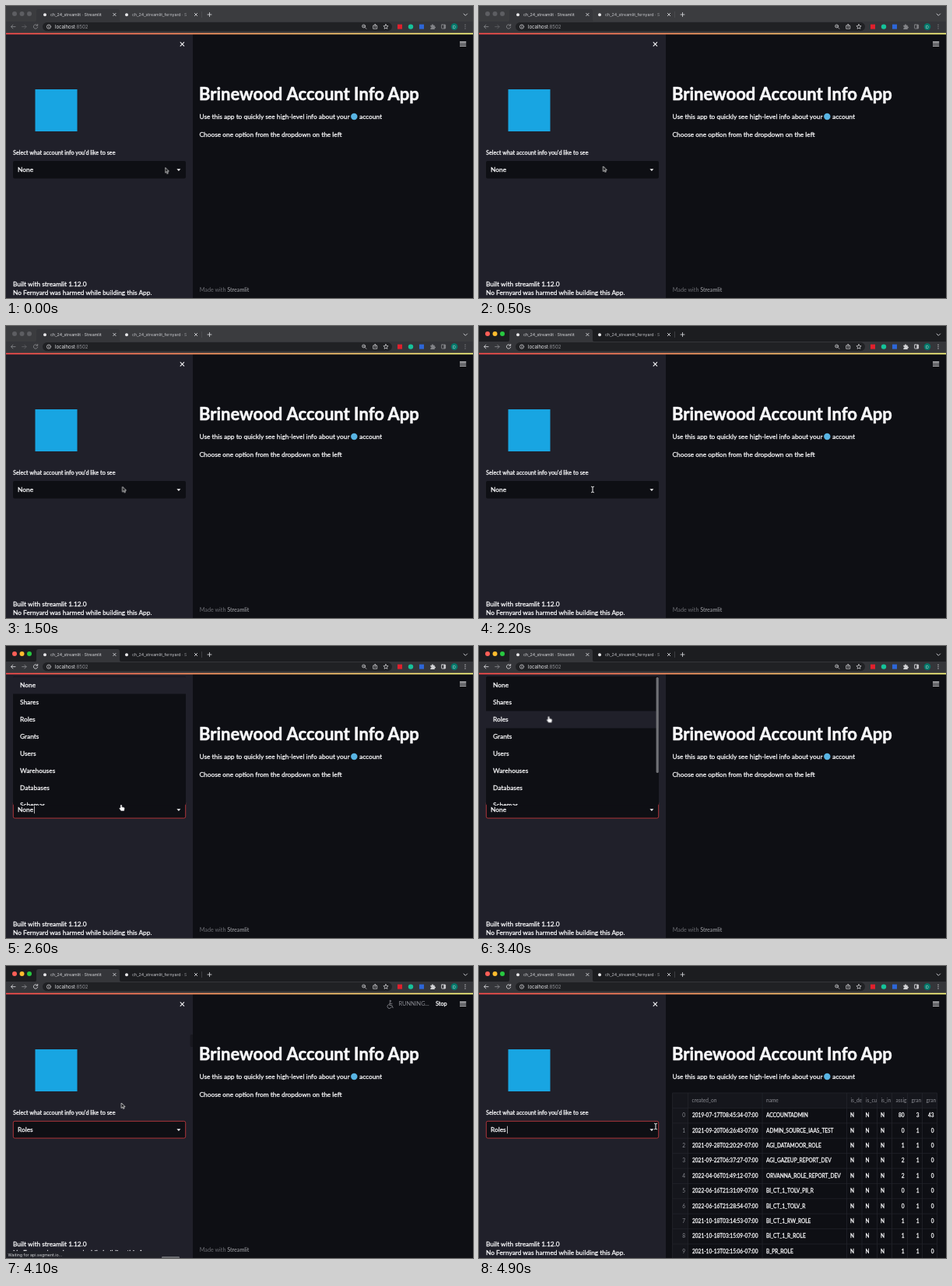
Write an HTML page that moves like this. It is 600 by 375 pixels and loops after 5 s.

```html
<!DOCTYPE html>
<html lang="en">
<head>
<meta charset="utf-8">
<title>Account Info App</title>
<style>
html, body { margin: 0; width: 100%; height: 100%; overflow: hidden; background: #0e0f14; }
svg { display: block; width: 100vw; height: 100vh; }
text { font: 8.36px Lato, sans-serif; fill: #fafafc; stroke: #fafafc; stroke-width: .26px; white-space: pre; }
text.ui { font: 5.3px Inter, sans-serif; fill: #d6d7da; stroke: none; }
text.url { font-size: 6.05px; fill: #e6e7ea; }
text.h1 { font-size: 22px; font-weight: 700; stroke-width: .5px; }
text.label { font-size: 7.3px; }
text.foot { font-size: 7.2px; fill: #6b6c72; stroke: none; }
text.cell { font-size: 6.55px; }
text.dim { fill: #8b8c93; stroke: none; }
.end { text-anchor: end; }
.mid { text-anchor: middle; }
.line { fill: none; stroke: #d0d1d4; stroke-width: .9; stroke-linecap: round; stroke-linejoin: round; }
.grid { fill: none; stroke: #25262d; stroke-width: .7; }

/* 2% of the loop is one 100 ms tick */
.anim { animation: 5s step-end infinite; }
.focus { animation-name: focus; }
.blur { animation-name: blur; }
.wake { animation-name: wake; }
.open { animation-name: open; }
.closed { animation-name: closed; }
.before { animation-name: before; }
.after { animation-name: after; }
.active { animation-name: active; }
.caret { animation-name: caret; }
.thumb { animation-name: thumb; }
.hover { animation-name: hover; }
.running { animation-name: running; }
.status { animation-name: status; }
.intro { animation-name: intro; }
.result { animation-name: result; }
.arrow { animation-name: arrow; }
.ibeam { animation-name: ibeam; }
.hand { animation-name: hand; }
.pointer { animation: move 5s infinite; }

@keyframes focus { 0% { opacity: 0 } 36%, 100% { opacity: 1 } }
@keyframes blur { 0% { opacity: 1 } 36%, 100% { opacity: 0 } }
@keyframes wake { 0% { opacity: .5 } 36%, 100% { opacity: 1 } }
@keyframes open { 0% { opacity: 0 } 48% { opacity: 1 } 70%, 100% { opacity: 0 } }
@keyframes closed { 0% { opacity: 1 } 48% { opacity: 0 } 70%, 100% { opacity: 1 } }
@keyframes before { 0% { opacity: 1 } 70%, 100% { opacity: 0 } }
@keyframes after { 0% { opacity: 0 } 70%, 100% { opacity: 1 } }
@keyframes active { 0% { opacity: 0 } 48%, 100% { opacity: 1 } }
@keyframes caret { 0%, 58%, 80% { opacity: 0 } 48%, 70%, 90%, 100% { opacity: 1 } }
@keyframes thumb { 0% { opacity: 0 } 54%, 100% { opacity: 1 } }
@keyframes hover {
  0% { transform: none }
  54% { transform: translateY(110px) }
  56% { transform: translateY(88px) }
  58%, 100% { transform: translateY(44px) }
}
@keyframes running { 0% { opacity: 0 } 72% { opacity: 1 } 84%, 100% { opacity: 0 } }
@keyframes status { 0% { opacity: 0 } 74% { opacity: 1 } 84%, 100% { opacity: 0 } }
@keyframes intro { 0% { opacity: 1 } 84%, 100% { opacity: 0 } }
@keyframes result { 0% { opacity: 0 } 84%, 100% { opacity: 1 } }
@keyframes arrow { 0%, 70% { opacity: 1 } 36%, 94%, 100% { opacity: 0 } }
@keyframes ibeam { 0%, 48% { opacity: 0 } 36%, 94%, 100% { opacity: 1 } }
@keyframes hand { 0%, 70%, 100% { opacity: 0 } 48% { opacity: 1 } }
@keyframes move {
  0% { transform: translate(204.5px, 207.5px); animation-timing-function: steps(6) }
  12% { transform: translate(150.5px, 205.5px); animation-timing-function: step-end }
  28% { transform: translate(150.5px, 205.5px); animation-timing-function: steps(5) }
  38%, 44% { transform: translate(146px, 210px); animation-timing-function: steps(2) }
  48%, 52% { transform: translate(148px, 204px); animation-timing-function: steps(3) }
  58%, 70% { transform: translate(89.5px, 90.5px); animation-timing-function: steps(3) }
  76% { transform: translate(114.5px, 163px); animation-timing-function: steps(10) }
  96%, 100% { transform: translate(227px, 206px) }
}
</style>
</head>
<body>
<svg viewBox="0 0 600 375" preserveAspectRatio="none">
  <defs>
    <linearGradient id="deco"><stop stop-color="#ff4b4b"/><stop offset="1" stop-color="#fffd80"/></linearGradient>
    <linearGradient id="fade" gradientUnits="userSpaceOnUse" x1="162" x2="240" y1="0" y2="0">
      <stop offset=".82" stop-color="#c4c5c9"/><stop offset="1" stop-color="#c4c5c9" stop-opacity="0"/>
    </linearGradient>
    <clipPath id="list"><rect x="9" y="39" width="222" height="165.5" rx="2"/></clipPath>
  </defs>

  <!-- browser window -->
  <rect width="600" height="21" fill="#1c1d20"/>
  <rect class="anim blur" width="600" height="21" fill="#3b3c3f"/>
  <path d="M36 20.5q3 0 3-3V7q0-3 3-3H143q3 0 3 3V17.5q0 3 3 3z" fill="#35363a"/>
  <rect y="20" width="600" height="16" fill="#35363a"/>
  <g class="anim blur" fill="#5d5e62"><circle cx="11" cy="10" r="3"/><circle cx="20.5" cy="10" r="3"/><circle cx="30" cy="10" r="3"/></g>
  <g class="anim focus"><circle cx="11" cy="10" r="3" fill="#ff5f57"/><circle cx="20.5" cy="10" r="3" fill="#febc2e"/><circle cx="30" cy="10" r="3" fill="#28c840"/></g>
  <circle cx="50" cy="11.2" r="2" fill="#e8e8ea"/>
  <circle cx="155" cy="11.2" r="2" fill="#e8e8ea"/>
  <text class="ui" x="57" y="13.3">ch_24_streamlit · Streamlit</text>
  <text class="ui" x="162" y="13.3" style="fill:url(#fade)">ch_24_streamlit_fernyard · S</text>
  <g class="line">
    <path d="M137.7 9.3l3.4 3.4m0-3.4l-3.4 3.4M242.3 9.3l3.4 3.4m0-3.4l-3.4 3.4M259 11h5m-2.5-2.5v5M588 10l2.3 2.3L592.6 10"/>
    <path d="M251.5 7.5v7" stroke="#55565a" stroke-width=".6"/>
  </g>
  <g class="line anim wake">
    <path d="M12 26.6H6.6m2.3-2.4l-2.4 2.4 2.4 2.4"/>
    <path d="M20.6 26.6H26m-2.3-2.4l2.4 2.4-2.4 2.4" stroke="#85868a"/>
    <path d="M40.3 24.9A2.7 2.7 0 1 0 40.7 27.2M40.7 23.4v1.9h-1.9"/>
  </g>
  <rect x="47" y="21" width="449" height="11.2" rx="5.6" fill="#202124"/>
  <g class="line" style="stroke-width:.75">
    <circle cx="55" cy="26.6" r="2.6"/><path d="M55 26.4v1.3M55 25.1v.1"/>
    <circle cx="459.6" cy="25.9" r="2"/><path d="M461.2 27.5l1.7 1.8M458.8 25.9h1.6"/>
    <path d="M473 25.2h-1.3v4h5v-4h-1.3M474.2 27.6v-4.2m-1.3 1.2l1.3-1.3 1.3 1.3"/>
    <path d="M488 23.5l.9 2 2.2.2-1.7 1.5.5 2.1-1.9-1.1-1.9 1.1.5-2.1-1.7-1.5 2.2-.2z"/>
  </g>
  <text class="ui url" x="63" y="28.7">localhost<tspan fill="#94959a">:8502</tspan></text>
  <rect x="503" y="23.6" width="6" height="6" fill="#e0202d"/>
  <circle cx="520" cy="26.6" r="3.2" fill="#15c39a"/>
  <rect x="531" y="23.6" width="6" height="6" fill="#2d66d8"/>
  <g class="anim wake" fill="#d0d1d4">
    <path d="M545.3 24.8h1.7q0-1.5 1-1.5t1 1.5h1.7v1.7q1.4 0 1.4 1t-1.4 1v1.6h-5.4v-1.7q1.2 0 1.2-.9t-1.2-.9z"/>
    <rect class="line" x="559.6" y="24" width="5" height="5" rx=".5"/>
    <path d="M562.4 24h2.2v5h-2.2z"/>
    <circle cx="590" cy="24.3" r=".7"/><circle cx="590" cy="26.6" r=".7"/><circle cx="590" cy="28.9" r=".7"/>
  </g>
  <circle cx="576" cy="26.6" r="4.3" fill="#00796b"/>
  <text class="ui mid" x="576" y="28.5">D</text>

  <!-- page -->
  <rect y="35.5" width="600" height="339.5" fill="#0e0f14"/>
  <rect y="35.5" width="240" height="339.5" fill="#20202a"/>
  <rect y="34.7" width="600" height="1.7" fill="url(#deco)"/>
  <path d="M583 46.4h8.2M583 48.8h8.2M583 51.2h8.2" stroke="#f6f6f8" stroke-width="1.1"/>
  <text class="h1" x="248" y="120.7">Brinewood</text>
  <text class="h1" x="360.5" y="120.7">Account Info App</text>
  <text x="248.5" y="145">Use this app to quickly see high-level info about your</text>
  <circle cx="447.3" cy="142" r="4.2" fill="#58b4e4"/>
  <text x="454" y="145">account</text>
  <g class="anim intro">
    <text x="248.5" y="168">Choose one option from the dropdown on the left</text>
    <text class="foot" x="248.8" y="367.3">Made with <tspan fill="#a6a7ac">Streamlit</tspan></text>
  </g>
  <g class="anim running">
    <g class="line" style="stroke:#85868c">
      <circle cx="493.6" cy="45" r=".8"/>
      <path d="M493.3 46.8l-.6 3.6h3l1.4 3.3M493.2 48.2h2.8M491.4 49.4a2.7 2.7 0 1 0 3.8 3.2"/>
    </g>
    <text class="label dim" x="504.5" y="51.4">RUNNING...</text>
    <text class="label" x="552" y="51.4">Stop</text>
  </g>
  <g id="table" class="anim result"></g>

  <!-- sidebar -->
  <g class="anim closed">
    <path d="M223.8 46.4l5.2 5.2m0-5.2l-5.2 5.2" stroke="#f4f4f6" stroke-width="1.1"/>
    <rect x="37.5" y="107" width="54" height="54" fill="#18a5e2"/>
    <text class="label" x="9" y="190.6">Select what account info you'd like to see</text>
  </g>
  <rect x="9" y="199" width="222" height="22.4" rx="2" fill="#0e0f14"/>
  <rect class="anim active" x="9.3" y="199.3" width="221.4" height="21.8" rx="2" fill="none" stroke="#d64046" stroke-width=".8"/>
  <text class="anim before" x="15" y="213.4">None</text>
  <text class="anim after" x="15" y="213.4">Roles</text>
  <path class="anim caret" d="M36.4 205.6v9.6" stroke="#fff" stroke-width=".8"/>
  <path d="M219.4 209.2h5l-2.5 2.7z" fill="#f4f4f6"/>
  <text x="9" y="359.8">Built with streamlit 1.12.0</text>
  <text x="9" y="370.6">No Fernyard was harmed while building this App.</text>
  <g class="anim status">
    <rect y="366" width="198" height="9" fill="#202128"/>
    <text class="ui" x="2.5" y="372.6">Waiting for api.segment.io...</text>
    <rect x="200" y="373" width="23" height="3" rx="1.2" fill="#68696e"/>
    <path d="M240 88h-1.5q-2 0-2 2v12q0 2 2 2h1.5z" fill="#18181f"/>
  </g>

  <g class="anim open">
    <g id="menu" clip-path="url(#list)">
      <rect x="9" y="39" width="222" height="166" fill="#0e0f14"/>
      <rect class="anim hover" x="9" y="39.5" width="222" height="22" fill="#20202a"/>
    </g>
    <rect class="anim thumb" x="227.6" y="40" width="3.2" height="123" rx="1.6" fill="#707176"/>
  </g>

  <!-- mouse pointer, hotspot at 0,0 -->
  <g class="pointer" stroke-linejoin="round">
    <path class="anim arrow" d="M0 0v6.6l1.6-1.4 1 2.3 1.1-.5-1-2.3h2.1z" fill="#08080a" stroke="#fff" stroke-width=".75"/>
    <path class="anim ibeam" d="M-1.9-3.8q1.9 0 1.9 1.2 0-1.2 1.9-1.2M0-2.6v5.2M-1.9 3.8q1.9 0 1.9-1.2 0 1.2 1.9 1.2" fill="none" stroke="#f4f4f4" stroke-width="1"/>
    <path class="anim hand" d="M-.7.6q.7-1 1.4 0v2.3l2.6.5q.9.2.8 1.2l-.5 2.8H-.2L-2.3 4.6q.3-1 1.6-.1z" fill="#fff" stroke="#e8e8ea" stroke-width=".5"/>
  </g>
</svg>
<script>
const NS = 'http://www.w3.org/2000/svg';

function add(parent, tag, attrs, text = '') {
  const el = document.createElementNS(NS, tag);
  for (const key in attrs) el.setAttribute(key, attrs[key]);
  el.textContent = text;
  parent.append(el);
}

const menu = document.getElementById('menu');
['None', 'Shares', 'Roles', 'Grants', 'Users', 'Warehouses', 'Databases', 'Schemas']
  .forEach((name, i) => add(menu, 'text', { x: 18, y: 53.4 + 22 * i }, name));

const table = document.getElementById('table');
const rows = `2019-07-17T08:45:34 ACCOUNTADMIN 80 3 43
2021-09-20T06:26:43 ADMIN_SOURCE_IAAS_TEST 0 1 0
2021-09-28T02:20:29 AGI_DATAMOOR_ROLE 1 1 0
2021-09-22T06:37:27 AGI_GAZEUP_REPORT_DEV 2 1 0
2022-04-06T01:49:12 ORVANNA_ROLE_REPORT_DEV 2 1 0
2022-06-16T21:31:09 BI_CT_1_TOLV_PII_R 0 1 0
2022-06-16T21:28:54 BI_CT_1_TOLV_R 0 1 0
2021-10-18T03:14:53 BI_CT_1_RW_ROLE 1 1 0
2021-10-18T03:15:09 BI_CT_1_R_ROLE 1 1 0
2021-10-13T02:15:06 B_PR_ROLE 1 1 0`.split('\n').map(row => row.split(' '));
const heads = ['created_on', 'name', 'is_de', 'is_cu', 'is_in', 'assig', 'gran', 'gran'];
const cols = [268.5, 364, 472.5, 492, 511.5, 530.5, 550.5, 569.5, 588.5];
const top0 = 163, rowH = 19.4;

function cell(x, y, text, cls = '') {
  add(table, 'text', { x, y: y + 2.4, class: 'cell ' + cls }, text);
}

add(table, 'rect', { x: 248.5, y: top0, width: 340, height: rowH, fill: '#15161c' });
add(table, 'rect', { x: 248.5, y: top0, width: 20, height: 212, fill: '#15161c' });
[248.5, ...cols].forEach(x => add(table, 'path', { d: `M${x} ${top0}V375`, class: 'grid' }));
for (let i = 0; i < 11; i++) add(table, 'path', { d: `M248.5 ${top0 + rowH * i}H588.5`, class: 'grid' });
heads.forEach((name, i) => cell(cols[i] + 5, 172.6, name, 'dim'));
rows.forEach(([date, name, ...counts], i) => {
  const y = 191.7 + rowH * i;
  cell(265, y, i, 'dim end');
  cell(cols[0] + 5.5, y, date + '-07:00');
  cell(cols[1] + 5, y, name);
  for (let c = 2; c < 5; c++) cell(cols[c] + 4.5, y, 'N');
  counts.forEach((n, c) => cell(cols[c + 6] - 4, y, n, 'end'));
});
</script>
</body>
</html>
```
